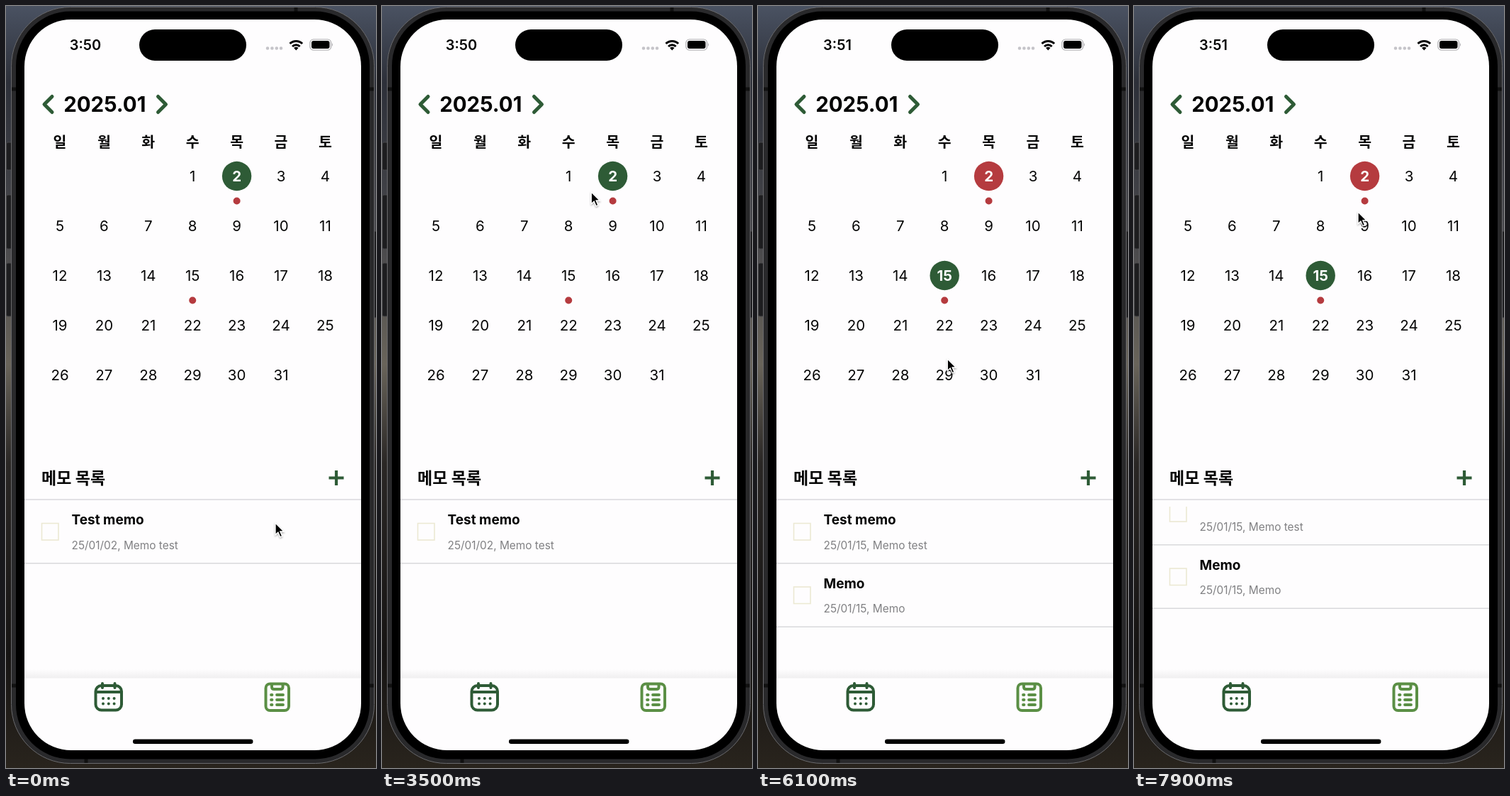
These frames come from a looping animation (522x1073 px, 8000 ms). An HTML page:

```html
<!DOCTYPE html>
<html lang="ko">
<head>
<meta charset="utf-8">
<style>
  html, body { margin: 0; width: 100%; height: 100%; overflow: hidden; background: #161413; }
  svg { display: block; }
  text { font-family: Inter, "Noto Sans CJK KR", "Noto Sans CJK", sans-serif; fill: #050505; }
  .mid { text-anchor: middle; }
  .bold { font-weight: 700; }
  .day { font-size: 20.5px; }
  .day.on { font-weight: 700; fill: #fff; }
  .title { font-size: 19px; font-weight: 700; }
  .note { font-size: 15.4px; fill: #808083; }
  .rule { stroke: #d9d9dc; stroke-width: 1.6; }
  .box { fill: none; stroke: #ece9d3; stroke-width: 1.6; }
  .line { fill: none; stroke-linecap: round; stroke-linejoin: round; }
</style>
</head>
<body>
<svg width="522" height="1073" viewBox="0 0 522 1073">
  <defs>
    <linearGradient id="photo" x2="0" y2="1">
      <stop offset="0" stop-color="#4a5262"/>
      <stop offset=".1" stop-color="#2d3039"/>
      <stop offset=".3" stop-color="#47474b"/>
      <stop offset=".47" stop-color="#69645a"/>
      <stop offset=".6" stop-color="#2a2725"/>
      <stop offset=".85" stop-color="#161413"/>
      <stop offset="1" stop-color="#29241d"/>
    </linearGradient>
    <linearGradient id="shade" x2="0" y2="1">
      <stop offset="0" stop-color="#fefdfe"/>
      <stop offset="1" stop-color="#f0eff0"/>
    </linearGradient>
    <clipPath id="listArea"><rect x="26" y="705" width="475" height="241"/></clipPath>
    <filter id="soft" x="-50%" y="-50%" width="200%" height="200%">
      <feDropShadow dx="0" dy="1.5" stdDeviation="1.2" flood-opacity=".35"/>
    </filter>
  </defs>

  <!-- Backdrop and phone -->
  <rect width="522" height="1073" fill="url(#photo)"/>
  <g fill="#1d1d1f" stroke="#48484b">
    <rect x="0.5" y="192" width="9" height="39" rx="2"/>
    <rect x="0.5" y="266" width="9" height="76" rx="2"/>
    <rect x="0.5" y="362" width="9" height="75" rx="2"/>
    <rect x="517" y="317" width="6" height="122" rx="2"/>
  </g>
  <rect x="7.5" y="1.5" width="512" height="1065" rx="83" fill="#29292b" stroke="#69696c"/>
  <path d="M8 117h7M8 957h7M512 117h7M512 957h7M409 2v7M113 1060v6" stroke="#111" stroke-width="5"/>
  <rect x="14" y="7.5" width="499" height="1053" rx="77"/>
  <rect x="26" y="19" width="475" height="1029" rx="66" fill="#fefdfe"/>

  <!-- Status bar -->
  <rect x="188" y="33" width="151" height="44" rx="22"/>
  <text id="clock" class="mid" x="112" y="62" font-size="20" font-weight="600"></text>
  <path class="line" d="M369 59.5h.01M375.4 59.5h.01M381.8 59.5h.01M388 59.5h.01" stroke="#c5c4c9" stroke-width="4.6"/>
  <path d="M400.5 53a12.5 12.5 0 0 1 17.6 0M404 57a7.6 7.6 0 0 1 10.6 0" fill="none" stroke="#000" stroke-width="3"/>
  <path d="M409.3 62.4l-3.2-3.3a4.6 4.6 0 0 1 6.4 0z"/>
  <rect x="429" y="47" width="29.5" height="15" rx="4.6" fill="none" stroke="#a5a5a8" stroke-width="1.2"/>
  <rect x="431" y="49" width="25.5" height="11" rx="3"/>
  <path d="M460 52q2 2.5 0 5z" fill="#a5a5a8"/>

  <!-- Calendar -->
  <g class="line" stroke="#2e5b36" stroke-width="5">
    <path d="M65 127.500L54 138.500L65 149.500"/>
    <path d="M214.500 127.500L225.500 138.500L214.500 149.500"/>
  </g>
  <text class="mid bold" x="139.300" y="148.500" font-size="29.500">2025.01</text>
  <g id="calendar"></g>

  <!-- Memo list -->
  <text class="bold" x="50" y="673" font-size="23">메모 목록</text>
  <path d="M455.500 664.500h21M466 654v21" stroke="#2e5b36" stroke-width="4.200"/>
  <path class="rule" d="M26 695h475"/>
  <g clip-path="url(#listArea)"><g id="list"></g></g>
  <text id="empty" class="mid" x="263" y="828.500" font-size="18.400">작성된 메모가 없습니다.</text>

  <!-- Tab bar -->
  <rect x="26" y="934" width="475" height="12.500" fill="url(#shade)"/>
  <g class="line" stroke="#2e5b36" stroke-width="4">
    <rect x="126.500" y="957" width="36.500" height="34.500" rx="8"/>
    <path d="M136 954v6M153.500 954v6M128 966h34"/>
    <path d="M137 975h.01M144.800 975h.01M152.600 975h.01M137 982.500h.01M144.800 982.500h.01M152.600 982.500h.01"/>
  </g>
  <g class="line" stroke="#5b8f45" stroke-width="4">
    <rect x="366.500" y="954.500" width="32.500" height="37.500" rx="6"/>
    <path d="M375 955v4q0 3 3 3h9.500q3 0 3-3v-4"/>
    <path d="M374 970h1.500M382 970h9M374 977h1.500M382 977h9M374 984h1.500M382 984h9" stroke-width="3.800"/>
  </g>
  <rect x="179" y="1032.500" width="169.500" height="6.500" rx="3.200"/>

  <path id="cursor" d="M0 0V16.600L3.900 13L6.800 19.700L9.600 18.500L6.800 12H12z" stroke="#fff" stroke-width="1.300" filter="url(#soft)"/>
</svg>
<script>
const $ = id => document.getElementById(id);
const LOOP = 8000, GREEN = '#2e5b36', RED = '#b53b3f', TODAY = 2;

// Each key is [time, ...values]
const cursorKeys = [
  [0, 380, 728], [1500, 329, 216], [2900, 255, 285], [4200, 346, 233], [4900, 447, 247],
  [5300, 441, 258], [5900, 264, 384], [6450, 275, 760], [6900, 274, 672], [7900, 316, 290]
];
const scrollKeys = [[6450, 0], [6900, 46], [7300, 26]];

function at(keys, t) {
  if (t <= keys[0][0]) return keys[0].slice(1);
  const next = keys.findIndex(k => k[0] > t);
  if (next < 0) return keys.at(-1).slice(1);
  const a = keys[next - 1], b = keys[next];
  const u = (t - a[0]) / (b[0] - a[0]), e = u * u * (3 - 2 * u);
  return a.slice(1).map((v, i) => v + (b[i + 1] - v) * e);
}

function calendar(selected) {
  const colX = i => 76 + 62.4 * i;
  let out = [...'일월화수목금토'].map((name, i) =>
    `<text class="mid bold" x="${colX(i)}" y="199" font-size="20.5">${name}</text>`).join('');
  for (let d = 1; d <= 31; d++) {
    const x = colX((d + 2) % 7), y = 239.5 + 70 * Math.floor((d + 2) / 7);
    const fill = d === selected ? GREEN : d === TODAY ? RED : null;
    if (fill) out += `<circle cx="${x}" cy="${y}" r="20.7" fill="${fill}"/>`;
    if (d === 2 || d === 15) out += `<circle cx="${x}" cy="${y + 35}" r="5" fill="${RED}"/>`;
    out += `<text class="mid day${fill ? ' on' : ''}" x="${x}" y="${y + 7.5}">${d}</text>`;
  }
  return out;
}

const memos = {
  2: [['Test memo', '25/01/02, Memo test']],
  4: [],
  15: [['Test memo', '25/01/15, Memo test'], ['Memo', '25/01/15, Memo']]
};

const memoRow = ([title, note], i) => `<g transform="translate(0 ${90 * i - i * .5})">
  <rect class="box" x="50.5" y="728.5" width="23.5" height="23.5"/>
  <text class="title" x="92.500" y="730">${title}</text>
  <text class="note" x="92.500" y="764.500">${note}</text>
  <path class="rule" d="M26 784.700h475"/></g>`;

let shown;
function select(day) {
  if (day === shown) return;
  shown = day;
  $('calendar').innerHTML = calendar(day);
  $('list').innerHTML = memos[day].map(memoRow).join('');
  $('empty').style.display = memos[day].length ? 'none' : '';
}

function draw(now) {
  const t = Math.floor(now % LOOP / 100) * 100;
  select(t < 5000 ? 2 : t < 6000 ? 4 : 15);
  $('clock').textContent = t < 3600 ? '3:50' : '3:51';
  $('list').setAttribute('transform', `translate(0 ${-at(scrollKeys, t)[0]})`);
  $('cursor').setAttribute('transform', `translate(${at(cursorKeys, t)})`);
  requestAnimationFrame(draw);
}
draw(performance.now());
</script>
</body>
</html>
```
